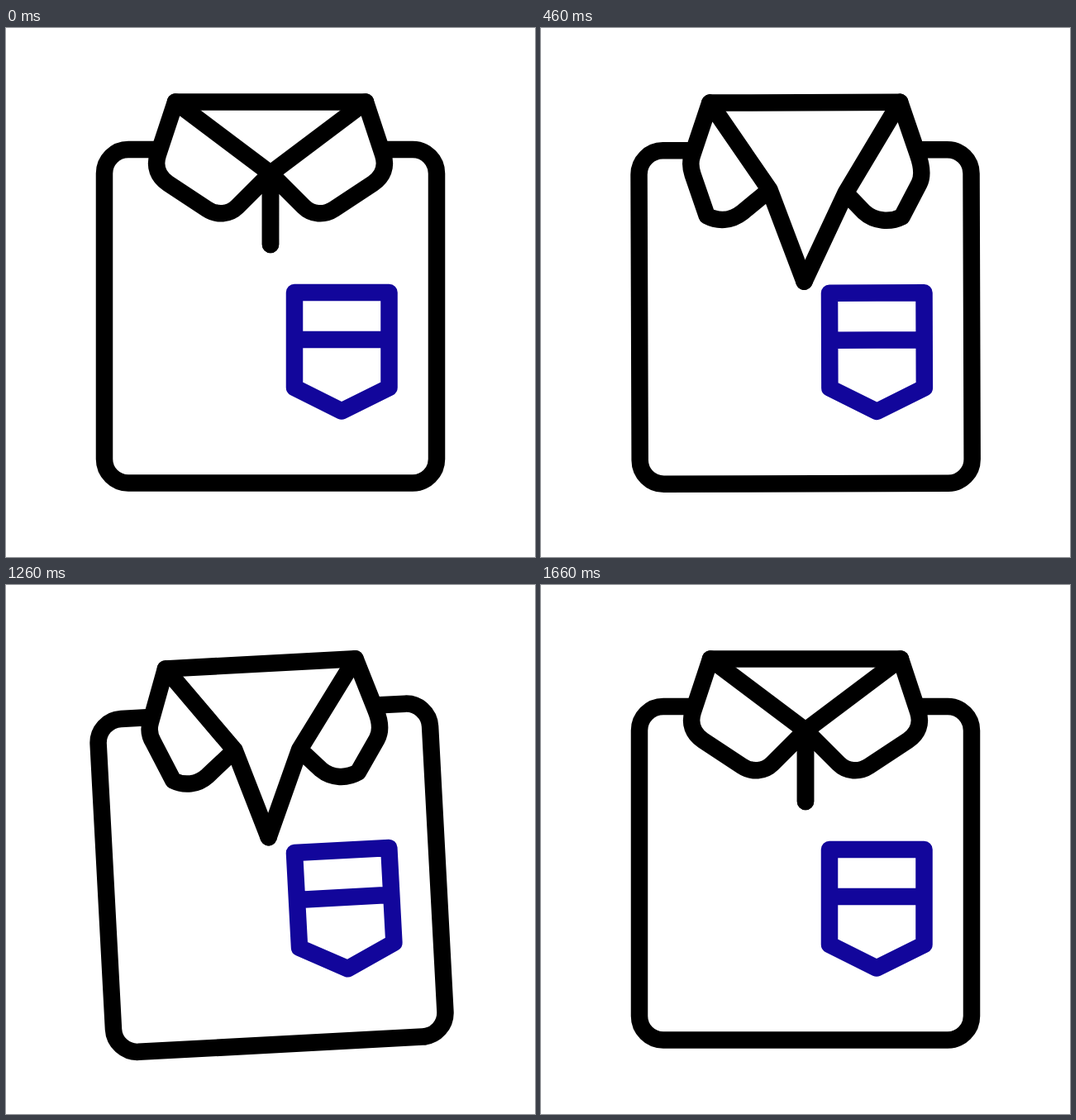
Recreate the animation shown at these times as an HTML page without scripts. Size 640 px wide and 640 px high, loop 1800 ms.

```html
<!DOCTYPE html>
<html lang="en">
<head>
<meta charset="utf-8">
<title>Shirt</title>
<style>
html, body { margin: 0; width: 100%; height: 100%; overflow: hidden; background: #fff; }
svg { display: block; width: 100%; height: 100%; }
path { fill: none; stroke: #000; stroke-width: 20.5; stroke-linecap: round; stroke-linejoin: round; }
.pocket { stroke: #12069b; }

.shirt {
  transform-origin: 320px 320px;
  animation: tilt 1.8s infinite, bob 1.8s infinite;
  animation-timing-function: cubic-bezier(.37, 0, .63, 1);
}
.left, .right { animation: left 1.8s cubic-bezier(.33, 0, .67, 1) infinite; }
.right { animation-name: right; }

@keyframes tilt {
  0%, 35.56%, 57.2%, 92.2%, 100% { rotate: 0deg; }
  8.9% { rotate: -3.2deg; }
  21.67% { rotate: 1deg; }
  30% { rotate: -1.6deg; }
  68.6% { rotate: -3.2deg; }
  80.56% { rotate: 1.2deg; }
}
@keyframes bob {
  0%, 30%, 57.2%, 89.4%, 100% { translate: 0 0; }
  17.2% { translate: 0 2.8px; }
  77.8% { translate: 0 8px; }
}
/* collar flaps: closed, then open */
@keyframes left {
  0%, 89.4%, 100% { d: path("M205 89.5L184 153C179 168 184 180 196 188L243 219C255 227 270 226 280 216L320 176L320 262M320 176L205 89.5"); }
  24.7%, 63.9% { d: path("M205 89.5L183.5 153C180 163 182 170 184 176L201 226C214 233 230 233 244 222L277 195L318.5 306M277 195L205 89.5"); }
}
@keyframes right {
  0%, 89.4%, 100% { d: path("M435 89.5L456 153C461 168 456 180 444 188L397 219C385 227 370 226 360 216L320 176L320 262M320 176L435 89.5"); }
  24.7%, 63.9% { d: path("M435 89.5L456.5 153C461 166 463 178 458 188L437 228C423 235 404 234 391 222L369 199L318.5 306M369 199L435 89.5"); }
}
</style>
</head>
<body>
<svg viewBox="0 0 640 640">
  <g class="shirt">
    <path d="M184 147H148A29 29 0 0 0 119 176V521.5A29 29 0 0 0 148 550.5H492A29 29 0 0 0 521 521.5V176A29 29 0 0 0 492 147H456"/>
    <path d="M205 89.5H435"/>
    <path class="left" d="M205 89.5L184 153C179 168 184 180 196 188L243 219C255 227 270 226 280 216L320 176L320 262M320 176L205 89.5"/>
    <path class="right" d="M435 89.5L456 153C461 168 456 180 444 188L397 219C385 227 370 226 360 216L320 176L320 262M320 176L435 89.5"/>
    <path class="pocket" d="M349 320H463.5V435L406 463.5L349 435ZM349 377H463.5"/>
  </g>
</svg>
</body>
</html>
```
